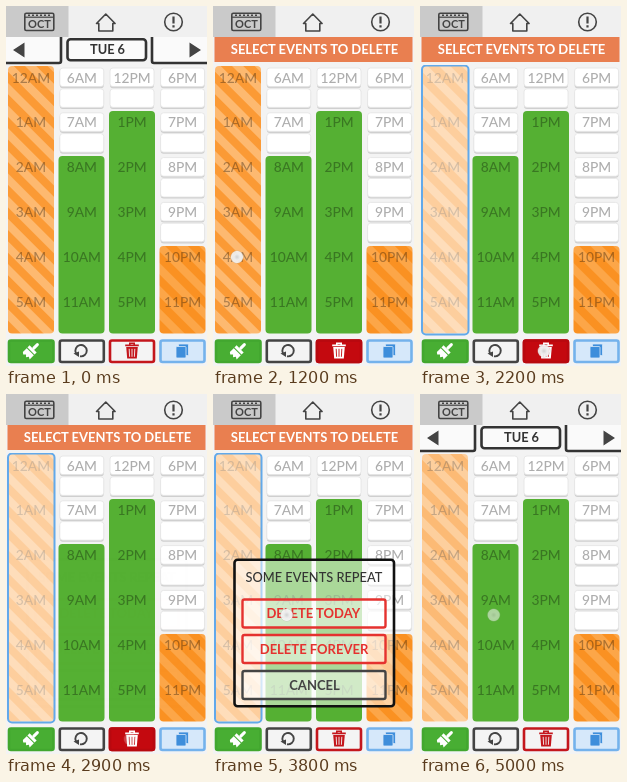
Write an HTML page that moves like this. It is 201 by 360 pixels and loops after 5.1 s.

```html
<!DOCTYPE html>
<html lang="en">
<head>
<meta charset="utf-8">
<title>Day planner</title>
<style>
  html, body { margin: 0; width: 100%; height: 100%; overflow: hidden; background: #f3f3f3; }
  svg { display: block; width: 100vw; height: 100vh; }
  text { font-family: Lato, "Open Sans", sans-serif; text-anchor: middle; }
  .hour { font-size: 13.8px; font-weight: 500; fill: #000; fill-opacity: .32; }
  .bold { font-weight: 700; }
  .line { fill: none; stroke: #444; }
  .btn { fill: #f4f4f4; stroke-width: 2.6; }
  .choice { fill: #fff; fill-opacity: .45; stroke-width: 2.4; }

  .anim { animation: 5100ms linear infinite both; }
  .cut { animation-timing-function: step-end; }

  .banner { animation-name: banner; }
  .dialog { animation-name: dialog; }
  .first { animation-name: first; }
  .border { animation-name: border; }
  .armed { animation-name: armed; }
  .pressed { animation-name: pressed; }
  .tap1 { animation-name: tap1; }
  .tap2 { animation-name: tap2; }
  .tap3 { animation-name: tap3; }
  .tap4 { animation-name: tap4; }

  @keyframes banner {
    0%, 17.647% { opacity: 0; }
    21.569%, 94.118% { opacity: 1; }
    97.059%, 100% { opacity: 0; }
  }
  @keyframes dialog {
    0%, 56.863% { opacity: 0; }
    60.784%, 92.157% { opacity: 1; }
    96.078%, 100% { opacity: 0; }
  }
  @keyframes first {
    0%, 35.294% { opacity: 1; }
    41.176% { opacity: .48; animation-timing-function: step-end; }
    98.039% { opacity: .68; animation-timing-function: step-end; }
    100% { opacity: 1; }
  }
  @keyframes border {
    0%, 35.294% { opacity: 0; }
    41.176% { opacity: 1; animation-timing-function: step-end; }
    96.078%, 100% { opacity: 0; }
  }
  @keyframes armed {
    0% { opacity: 0; }
    13.725% { opacity: 1; }
    58.824%, 100% { opacity: 0; }
  }
  @keyframes pressed {
    0% { opacity: 0; }
    90.196%, 100% { opacity: 1; }
  }
  @keyframes tap1 {
    0% { opacity: 0; animation-timing-function: step-end; }
    1.961%, 13.725% { opacity: 1; }
    21.569%, 100% { opacity: 0; }
  }
  @keyframes tap2 {
    0% { opacity: 0; animation-timing-function: step-end; }
    23.529%, 35.294% { opacity: 1; }
    43.137%, 100% { opacity: 0; }
  }
  @keyframes tap3 {
    0% { opacity: 0; animation-timing-function: step-end; }
    43.137%, 50.98% { opacity: 1; }
    58.824%, 100% { opacity: 0; }
  }
  @keyframes tap4 {
    0% { opacity: 0; animation-timing-function: step-end; }
    74.51%, 90.196% { opacity: 1; }
    98.039% { opacity: .6; animation-timing-function: step-end; }
    100% { opacity: 0; }
  }
</style>
</head>
<body>
<svg viewBox="0 0 201 360" preserveAspectRatio="none">
  <defs>
    <pattern id="stripe" width="16" height="16" patternUnits="userSpaceOnUse" patternTransform="rotate(45) translate(0 -4)">
      <rect width="16" height="16" fill="#fb9a35"/>
      <rect width="16" height="8" fill="#fdb970"/>
    </pattern>
    <pattern id="stripe2" width="16" height="16" patternUnits="userSpaceOnUse" patternTransform="rotate(45) translate(0 -4)">
      <rect width="16" height="16" fill="#fa9122"/>
      <rect width="16" height="8" fill="#fca648"/>
    </pattern>
    <radialGradient id="touch">
      <stop offset="0" stop-color="#d2d2d2"/>
      <stop offset=".45" stop-color="#ececec"/>
      <stop offset=".85" stop-color="#f4f4f4" stop-opacity=".9"/>
      <stop offset="1" stop-color="#bbb" stop-opacity=".6"/>
    </radialGradient>
    <circle id="tap" r="6.5" fill="url(#touch)"/>
    <g id="trash">
      <path d="M-6.8-5.4h13.600M-2.2-5.800v-1.700h4.400v1.700" fill="none" stroke="currentColor" stroke-width="1.600"/>
      <path d="M-5.800-3.800h11.600l-1 11.600h-9.600z" fill="currentColor"/>
      <path d="M-2.800-2l.4 8M0-2v8M2.800-2l-.4 8" stroke-width=".9" style="stroke: var(--gap)"/>
    </g>
  </defs>

  <rect width="201" height="360" fill="#f3f3f3"/>

  <!-- day switcher -->
  <g stroke="#333" stroke-width="2.6" fill="#fafafa">
    <rect x="-8" y="24" width="63" height="33" rx="2"/>
    <rect x="146" y="24" width="63" height="33" rx="2"/>
    <rect x="61.500" y="33.200" width="78.500" height="21" rx="3"/>
  </g>
  <path d="M7 44l11.500-7.500v15zM195 44l-11.500-7.500v15z" fill="#444"/>
  <text class="bold" x="101.500" y="48.300" font-size="12.800" fill="#333">TUE 6</text>

  <g id="slots"></g>

  <!-- coloured blocks -->
  <rect x="2" y="60" width="46" height="267.500" rx="4" fill="#fff"/>
  <g class="anim first">
    <rect transform="translate(2 60)" width="46" height="267.500" rx="4" fill="url(#stripe)"/>
    <g id="hours0"></g>
  </g>
  <rect class="anim border" x="2" y="59.500" width="46.500" height="269" rx="4" fill="none" stroke="#62a9ea" stroke-width="2"/>
  <rect x="52.500" y="150" width="46" height="177.500" rx="4" fill="#55b033"/>
  <rect x="103" y="105" width="46" height="222.500" rx="4" fill="#55b033"/>
  <rect transform="translate(153.500 240)" width="46" height="87.500" rx="4" fill="url(#stripe2)"/>
  <g id="hours"></g>

  <!-- header -->
  <rect width="201" height="31" fill="#f0f0f0"/>
  <rect width="62.500" height="31" fill="#cacaca"/>
  <g class="line" stroke-width="1.600">
    <rect x="18.800" y="7.200" width="29" height="17.300" rx="1.500"/>
    <path d="M19 11.200h29" stroke-width="1.200"/>
    <path d="M22 9.200h24" stroke-dasharray="2 2"/>
    <path d="M90.500 17.500l9.300-9.500 9.300 9.500h-2.300v7.500h-14v-7.500z" stroke-linejoin="round"/>
    <circle cx="167.500" cy="16" r="8.800"/>
    <path d="M167.500 10.500v7M167.500 19.300v2.200" stroke-width="2.200"/>
  </g>
  <text class="bold" x="33.500" y="22.300" font-size="11" fill="#444">OCT</text>

  <g class="anim banner">
    <rect y="31" width="201" height="28" fill="#f3f3f3"/>
    <rect x="1.500" y="31" width="198" height="25" fill="#e97f50"/>
    <text class="bold" x="101.500" y="48.300" font-size="13" fill="#fff">SELECT EVENTS TO DELETE</text>
  </g>

  <!-- toolbar -->
  <rect class="btn" x="3" y="334.500" width="44.500" height="21.500" rx="2" style="fill:#48ae33" stroke="#42a72f"/>
  <g transform="translate(25 345) rotate(45)" fill="#fff">
    <rect x="-1.500" y="-10.500" width="3" height="8" rx="1.500"/>
    <rect x="-5" y="-3" width="10" height="3"/>
    <path d="M-5 1h10v6l-2.500-1.500-1.500 2.500-2-2-2 2-2-1.500z"/>
  </g>
  <rect class="btn" x="53.800" y="334.500" width="44" height="21.500" rx="2" stroke="#444"/>
  <path class="line" d="M74 350.300a5.700 5.700 0 1 0-4-3" stroke-width="1.900"/>
  <path d="M67.500 347.500l5.500-2v5.500z" fill="#444"/>
  <rect class="btn" x="104" y="334.500" width="44" height="21.500" rx="2" stroke="#c4161c"/>
  <use href="#trash" x="126" y="344.800" color="#c4161c" style="--gap:#f4f4f4"/>
  <g class="anim cut armed">
    <rect class="btn" x="104" y="334.500" width="44" height="21.500" rx="2" style="fill:#c4090f" stroke="#b8090f"/>
    <use href="#trash" x="126" y="344.800" color="#fff" style="--gap:#c4090f"/>
  </g>
  <rect class="btn" x="154.500" y="334.500" width="44" height="21.500" rx="2" style="fill:#d6e8fa" stroke="#74b2ec"/>
  <g fill="#3e8edb" stroke="#d6e8fa" stroke-width=".8">
    <rect x="172.500" y="338" width="10" height="11.500" rx="1"/>
    <rect x="170" y="340.500" width="10" height="11.500" rx="1"/>
  </g>

  <!-- repeat dialog -->
  <g class="anim dialog">
    <rect x="21.500" y="165.700" width="159.500" height="146.500" rx="3" fill="#fff" fill-opacity=".5" stroke="#111" stroke-width="2.600"/>
    <text x="101" y="188" font-size="12.800" font-weight="500" fill="#333">SOME EVENTS REPEAT</text>
    <g class="bold" font-size="13">
      <rect class="choice" x="29.500" y="205.500" width="143" height="28" rx="2" stroke="#e5322f"/>
      <text x="100.300" y="224.300" fill="#e5322f">DELETE TODAY</text>
      <g class="anim cut pressed">
        <rect x="28.200" y="204.200" width="145.600" height="30.600" rx="3" fill="#e5322f"/>
        <text x="100.300" y="224.300" fill="#f8ded8">DELETE TODAY</text>
      </g>
      <rect class="choice" x="29.500" y="241" width="143" height="28" rx="2" stroke="#e5322f"/>
      <text x="101" y="259.800" fill="#e5322f">DELETE FOREVER</text>
      <rect class="choice" x="29.500" y="277" width="143" height="28" rx="2" stroke="#444"/>
      <text x="101.500" y="295.800" fill="#444">CANCEL</text>
    </g>
  </g>

  <g class="anim tap1"><use href="#tap" x="124" y="345"/></g>
  <g class="anim tap2"><use href="#tap" x="24" y="251"/></g>
  <g class="anim tap3"><use href="#tap" x="124" y="345"/></g>
  <g class="anim tap4"><use href="#tap" x="73.700" y="221"/></g>
</svg>
<script>
  const NS = "http://www.w3.org/2000/svg";
  const ROW = 44.8;
  const centers = [25, 75.8, 126, 176.6];
  const freeHours = [0, 2, 1, 4];
  const find = id => document.getElementById(id);

  function add(parent, tag, attrs, label) {
    const el = document.createElementNS(NS, tag);
    for (const key in attrs) el.setAttribute(key, attrs[key]);
    if (label) el.textContent = label;
    parent.appendChild(el);
  }

  function addSlot(x, y) {
    const box = { x: x - 22, width: 44, height: 18.6, rx: 3 };
    add(find("slots"), "rect", { ...box, y: y + 1.6, fill: "#cfcfcf" });
    add(find("slots"), "rect", { ...box, y, fill: "#fff", stroke: "#e2e2e2", "stroke-width": .8 });
  }

  centers.forEach((x, col) => {
    for (let row = 0; row < 6; row++) {
      const y = 62 + row * ROW;
      if (row < freeHours[col]) {
        addSlot(x, y);
        addSlot(x, y + 20.8);
      }
      const hour = col * 6 + row;
      const label = (hour % 12 || 12) + (hour < 12 ? "AM" : "PM");
      add(find(col ? "hours" : "hours0"), "text", { class: "hour", x, y: y + 14.6 }, label);
    }
  });
</script>
</body>
</html>
```
